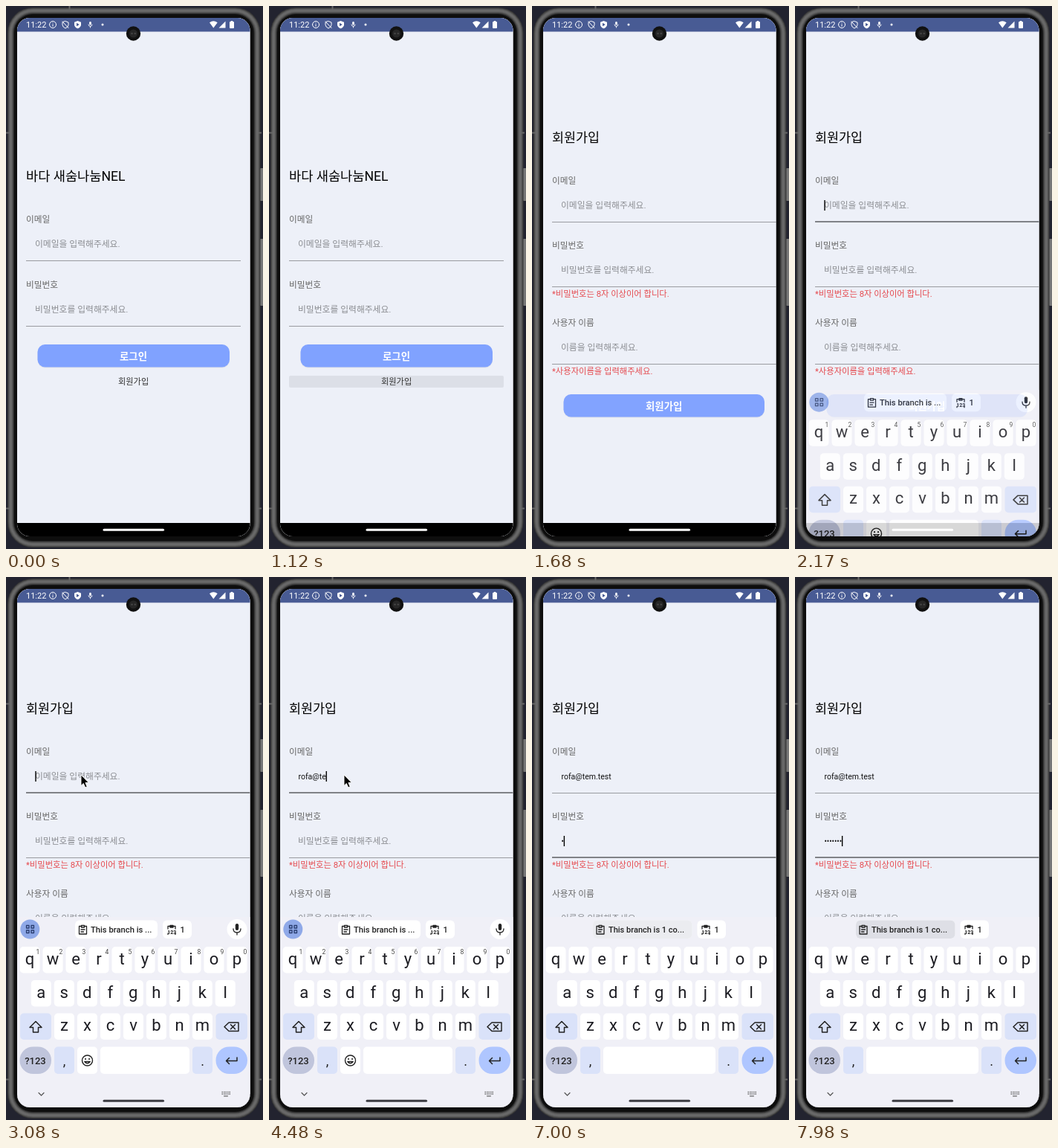
Animation of 346x730 px, one loop 8 s. Source, as an HTML page:

```html
<!DOCTYPE html>
<html lang="ko">
<head>
<meta charset="utf-8">
<title>Sign up</title>
<style>
html, body { margin: 0; width: 100%; height: 100%; overflow: hidden; background: #22232f; }
svg { display: block; width: 346px; height: 730px; font-family: Roboto, "Noto Sans CJK KR", "Noto Sans CJK", sans-serif; }
text { white-space: pre; }
.line { fill: none; stroke-linecap: round; stroke-linejoin: round; }
</style>
</head>
<body>
<svg viewBox="0 0 346 730">
  <defs>
    <clipPath id="screen"><rect x="15" y="16" width="313.5" height="697" rx="17"/></clipPath>
  </defs>

  <g fill="#777">
    <rect x="342" y="218" width="6" height="44" rx="1"/>
    <rect x="342" y="313" width="6" height="90" rx="1"/>
  </g>
  <g id="body"></g>
  <path d="M0 170.500H5M0 675.500H5M339 170.500H344M339 675.500H344M85.500 0V6" stroke="#666" stroke-width="2"/>

  <g clip-path="url(#screen)">
    <rect x="15" y="16" width="314" height="697" fill="#fff"/>
    <g id="login"></g>
    <g id="signup"></g>
    <rect x="15" y="16" width="314" height="18.500" fill="#485b94"/>
    <rect x="15" y="695" width="314" height="18" fill="#000"/>
    <g id="keyboard"></g>
    <rect id="pill" x="130.500" y="702.700" width="82.500" height="3" rx="1.500"/>
    <g id="status" fill="#fff"></g>
  </g>

  <g>
    <circle cx="171.500" cy="37" r="9.700" fill="#111"/>
    <circle cx="171.500" cy="37" r="5.500" fill="#262626"/>
    <circle cx="169.500" cy="37" r="1.300" fill="#444"/>
    <circle cx="173.800" cy="37" r="1.300" fill="#444"/>
  </g>
  <path id="pointer" transform="translate(101 266)" d="M0 0V14.500L3.300 11.500 5.700 17 8.200 16 5.900 10.600H10.300Z" stroke="#fff" stroke-width=".9"/>
</svg>

<script>
const $ = id => document.getElementById(id);
const BG = '#edf0f8', BLUE = '#80a2ff', KEY = '#fff', SOFT = '#dae2f9';
const EMAIL = 'rofa@tem.test';

// y is the middle of the text
const text = (x, y, size, str, fill = '#000', more = '') =>
  `<text x="${x}" y="${y + size * .375}" font-size="${size}" fill="${fill}" ${more}>${str}</text>`;
const mid = (x, y, size, str, fill, more = '') => text(x, y, size, str, fill, 'text-anchor="middle" ' + more);
const rect = (x, y, w, h, r, fill, more = '') =>
  `<rect x="${x}" y="${y}" width="${w}" height="${h}" rx="${r}" fill="${fill}" ${more}/>`;
const line = (d, stroke = '#222', w = 1.3) =>
  `<path class="line" d="${d}" stroke="${stroke}" stroke-width="${w}"/>`;
const disc = (x, y, r, fill) => `<circle cx="${x}" cy="${y}" r="${r}" fill="${fill}"/>`;
const button = (y, w, label, x) =>
  rect(42.5, y + 1, w, 30.5, 10, '#0001') + rect(42.5, y, w, 30.5, 10, BLUE) +
  text(x, y + 15.5, 13.4, label, '#fff', 'font-weight="bold"');
const field = (y, label, hint, end, id) => {
  const base = Math.floor(y + 55.6);
  return text(27, y, 11.7, label, '#666') +
    text(39, y + 33, 11.8, hint, '#8b8d92', `id="${id}Hint"`) +
    rect(27, base, end - 27, 1, 0, '#999ba0') +
    rect(27, base - 1, end - 27, 2, 0, '#808287', `id="${id}Focus" display="none"`);
};
const page = rect(15, 16, 314, 697, 0, BG);

// phone body: nested outlines shading from a grey rim to the black bezel
$('body').innerHTML = [...Array(12).keys()].map(d => {
  const grey = Math.round(14 + 92 * Math.max(0, Math.sin(Math.PI * (d + 1.5) / 10.5)));
  return rect(2 + d, 2 + d, 340.5 - 2 * d, 726 - 2 * d, 34 - d, `rgb(${grey},${grey},${grey})`);
}).join('');

$('login').innerHTML = page +
  text(27, 228, 17.6, '바다 새숨나눔NEL') +
  field(286.5, '이메일', '이메일을 입력해주세요.', 316, 'a') +
  field(374.5, '비밀번호', '비밀번호를 입력해주세요.', 316, 'b') +
  button(455, 258.5, '로그인', 153) +
  rect(27, 497, 289, 16, 2, '#00000012', 'id="ripple"') +
  text(151, 505, 11.2, '회원가입', '#333');

$('signup').innerHTML = page +
  text(27, 176, 17.4, '회원가입') +
  field(234.5, '이메일', '이메일을 입력해주세요.', 329, 'mail') +
  field(322, '비밀번호', '비밀번호를 입력해주세요.', 329, 'pass') +
  text(27, 387, 11.3, '*비밀번호는 8자 이상이어 합니다.', '#e5484d') +
  field(426, '사용자 이름', '이름을 입력해주세요.', 329, 'name') +
  text(27, 490.5, 11.3, '*사용자이름을 입력해주세요.', '#e5484d') +
  button(522, 270.5, '회원가입', 153) +
  text(39.5, 268, 10.5, '', '#111', 'id="mail"') +
  text(39.5, 354.8, 10, '', '#111', 'id="pass"') +
  rect(39.3, 261, 1.4, 14, 0, '#000', 'id="caret"');

$('status').innerHTML =
  text(27, 25.2, 11, '11:22', '#fff') +
  line('M58.500 25a4.500 4.500 0 1 0 9 0a4.500 4.500 0 1 0 -9 0M63 24.800V27.200M63 22.700V22.800', '#fff', 1) +
  line('M80 20.500L84 22V25.500Q83.500 28.500 80 30Q76.500 28.500 76 25.500V22ZM76 21L84 29.500', '#fff', 1) +
  '<path d="M96.500 20L101 21.700V25.500Q100.500 28.700 96.500 30.300Q92.500 28.700 92 25.500V21.700Z"/>' +
  '<path d="M95 22.800V27.200L98.800 25Z" fill="#485b94"/>' +
  rect(112.2, 21, 2.6, 4.5, 1.3, '#fff') +
  line('M111 25Q111 27.300 113.500 27.300T116 25M113.500 27.300V29', '#fff', .9) +
  disc(130, 25, 1.5, '#fff') +
  '<path d="M274 22.300Q279.300 18 284.700 22.300L279.300 29.500ZM286.500 29.500L295.500 20.500V29.500Z"/>' +
  rect(301, 21, 6, 9, 1, '#fff') + rect(302.7, 20, 2.6, 2, 0, '#fff');

// keyboard
const clip = x => line(`M${x + 3} 469.500H${x}V480H${x + 10}V469.500H${x + 7}M${x + 3} 468.500H${x + 7}V471H${x + 3}ZM${x + 2.5} 474H${x + 7.5}M${x + 2.5} 477H${x + 6}`);
const clip123 = x => line(`M${x} 473V469.500H${x + 10}V473M${x + 3} 468.500H${x + 7}V471H${x + 3}ZM${x} 479V480.500M${x + 10} 479V480.500`) +
  mid(x + 5.3, 477, 7, '123', '#222', 'font-weight="bold"');
const chip = (x, w, fill = KEY, more) => rect(x, 461.5, w, 24.5, 6, fill, more);
const row = (letters, x, y) => [...letters].map((c, i) =>
  rect(x + 31 * i - 13.5, y, 27, 35.5, 5, KEY) + mid(x + 31 * i, y + 15.5, 22, c, '#1c1c22')).join('');
const digits = [...'1234567890'].map((c, i) => mid(43 + 31 * i, 503.5, 8.5, c, '#444')).join('');

$('keyboard').innerHTML = rect(15, 457, 314, 260, 0, '#f0f0f7') +
  row('qwertyuiop', 32, 497) + row('asdfghjkl', 47.3, 542) + row('zxcvbnm', 78.5, 586.5) +
  rect(19, 586.5, 42, 35.5, 5, SOFT) + line('M40 597.500L32 605.500H36.500V612H43.500V605.500H48Z', '#222', 1.5) +
  rect(282.5, 586.5, 42.5, 35.5, 5, SOFT) +
  line('M300 599H313V610.500H300L294 604.700ZM302.500 601.800L308.500 607.800M308.500 601.800L302.500 607.800', '#222', 1.5) +
  rect(18.5, 631.5, 42.5, 36.5, 18, '#c0c5dc') + mid(39.5, 649.8, 13, '?123', '#222', 'font-weight="500"') +
  rect(65, 631.5, 27, 36.5, 5, SOFT) + mid(78.5, 650, 18, ',', '#222') +
  rect(251, 631.5, 27, 36.5, 5, SOFT) + mid(264.5, 650, 18, '.', '#222') +
  rect(282.5, 631.5, 42.5, 36.5, 18, '#afc6ff') + line('M311 646V650.500H297M300.500 646.500L296.500 650.500L300.500 654.500', '#222', 1.5) +
  line('M44 693.500L47.500 697L51 693.500', '#555', 1.2) +
  '<path d="M290.500 692.500H302M290.500 695H302" stroke="#666" stroke-width="1.300" stroke-dasharray="1.500 1"/>' +
  line('M293.500 697.800H298.500', '#666', 1.2) +
  `<g id="plain">${digits}
    ${disc(32.3, 473.5, 13, '#8fa9e8')}
    ${line('M27.500 468.500H31V472H27.500ZM34 468.500H37.500V472H34ZM27.500 475H31V478.500H27.500ZM34 475H37.500V478.500H34Z', '#2a3e70')}
    ${chip(93, 111)}${clip(98.5)}${text(114, 474, 11.2, 'This branch is ...', '#222', 'font-weight="500"')}
    ${chip(211, 39)}${clip123(218)}${text(234.5, 474, 11, '1', '#222', 'font-weight="500"')}
    ${disc(311, 473.5, 13.5, KEY)}
    ${rect(308.8, 466, 4.4, 9, 2.2, '#222')}${line('M306 473Q306 478 311 478T316 473M311 478V481')}
    ${rect(96, 631.5, 27, 36.5, 5, KEY)}
    ${line('M102.500 650a7 7 0 1 0 14 0a7 7 0 1 0 -14 0M105.800 651.500Q109.500 656 113.200 651.500Z', '#222', 1.4)}
    ${disc(107, 648, 1.1, '#222')}${disc(112, 648, 1.1, '#222')}
    ${rect(127, 631.5, 120, 36.5, 5, KEY)}</g>
  <g id="secure">
    ${chip(82, 133.5)}${chip(82, 133.5, '#dedfe6', 'id="held"')}${clip(87)}
    ${text(103, 474, 11, 'This branch is 1 co...', '#222', 'font-weight="500"')}
    ${chip(222.5, 38.5)}${clip123(229)}${text(245.5, 474, 11, '1', '#222', 'font-weight="500"')}
    ${rect(96, 631.5, 151, 36.5, 5, KEY)}</g>`;

const mailKeys = [3430, 3570, 3780, 3850, 4130, 4340, 4480, 4620, 4690, 4970, 5040, 5180, 5320];
const passKeys = [6860, 7140, 7280, 7490, 7630, 7840, 7980];
const typed = (keys, t) => keys.filter(k => t >= k).length;
const ramp = (t, from, len) => Math.min(1, Math.max(0, (t - from) / len));
const show = (id, on) => $(id).setAttribute('display', on ? 'inline' : 'none');

// cubic-bezier(.4, 0, .2, 1)
function ease(x) {
  let lo = 0, hi = 1, s;
  for (let i = 0; i < 20; i++) {
    s = (lo + hi) / 2;
    if (3 * (1 - s) * s * (.4 * (1 - s) + .2 * s) + s ** 3 < x) lo = s; else hi = s;
  }
  return x >= 1 ? 1 : x <= 0 ? 0 : 3 * (1 - s) * s * s + s ** 3;
}

function draw(now) {
  const t = Math.floor(now % 8000 / 70) * 70;

  const fade = ease(ramp(t, 1110, 700));
  $('login').setAttribute('opacity', 1 - fade);
  $('signup').setAttribute('opacity', fade);
  show('ripple', t >= 1120);

  const rise = 1 - (1 - ramp(t, 2000, 440)) ** 3;
  $('keyboard').setAttribute('opacity', Math.min(1, rise * 1.1));
  $('keyboard').setAttribute('transform', `translate(0 ${256 * (1 - rise)})`);
  $('pill').setAttribute('fill', rise < .85 ? '#fff' : '#3c3c42');

  const secure = t >= 6300;
  show('plain', !secure);
  show('secure', secure);
  $('held').setAttribute('opacity', ramp(t, 6800, 340));

  const mailCount = typed(mailKeys, t), passCount = typed(passKeys, t);
  $('mail').textContent = EMAIL.slice(0, mailCount);
  $('pass').textContent = '•'.repeat(passCount);
  show('mailHint', !mailCount);
  show('passHint', !passCount);
  show('mailFocus', t >= 2030 && t < 6370);
  show('passFocus', t >= 6370);

  const active = $(secure ? 'pass' : 'mail');
  const width = active.textContent ? active.getComputedTextLength() : 0;
  $('caret').setAttribute('x', 39.3 + width);
  $('caret').setAttribute('y', secure ? 348 : 261);
  show('caret', t >= 2030 && !(t >= 2590 && t < 3080) && !(t >= 5810 && t < 6300));
  show('pointer', t >= 2380 && t < 5880);
}

let start;
function tick(now) {
  start ??= now;
  draw(now - start);
  requestAnimationFrame(tick);
}
draw(0);
requestAnimationFrame(tick);
</script>
</body>
</html>
```
